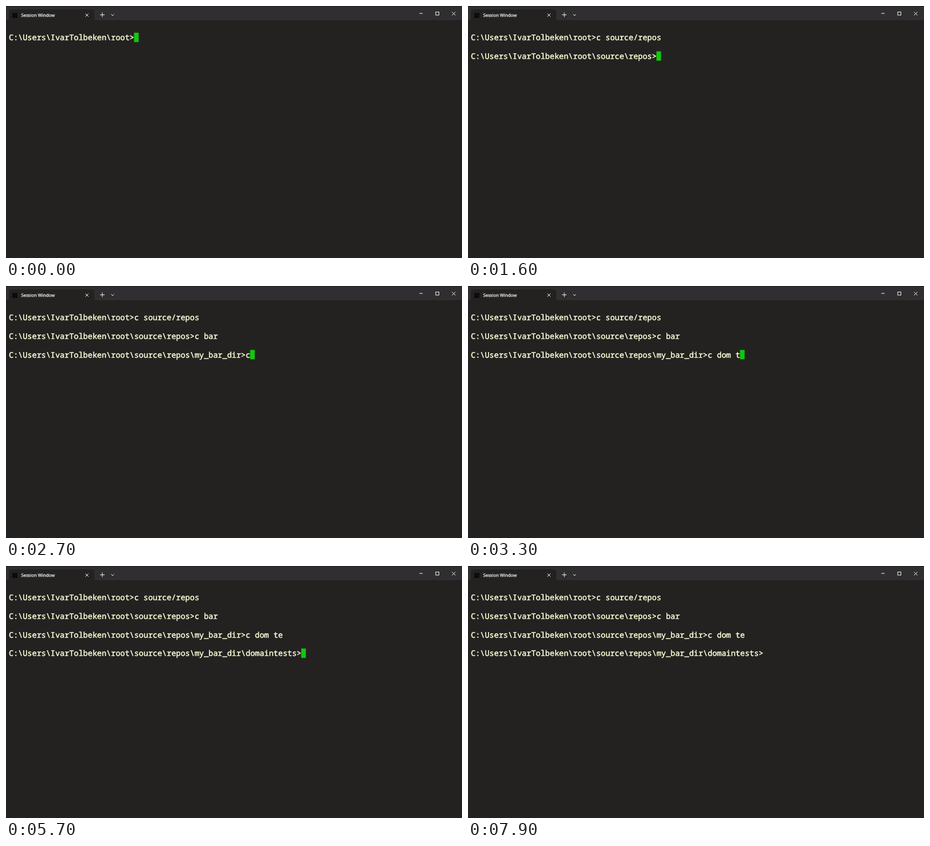
An HTML page for the animation above (8 s loop, 800 by 443 pixels).

```html
<!DOCTYPE html>
<html lang="en">
<head>
<meta charset="utf-8">
<title>Terminal</title>
<style>
  html, body { margin: 0; width: 100%; height: 100%; overflow: hidden; background: #232221; }
  svg { display: block; width: 800px; height: 443px; }
  text { white-space: pre; text-rendering: geometricPrecision; }
  .tab { font: 500 7.8px "Open Sans", "Noto Sans", sans-serif; fill: #fff; stroke: #fff; stroke-width: .25; }
  .line {
    font: 500 13.58px "Noto Sans Mono", "DejaVu Sans Mono", monospace;
    fill: #fffcd6; stroke: #fffcd6; stroke-width: .5;
  }
  .icons { fill: none; stroke: #f2f2f2; stroke-width: 1; }
</style>
</head>
<body>
<svg viewBox="0 0 800 443">
  <rect width="800" height="443" fill="#232221"/>
  <rect width="800" height="25" fill="#302e30"/>
  <rect width="800" height="1" fill="#1c1b1c"/>
  <path d="M2 25Q5 25 5 22V11Q5 6 10 6H150Q155 6 155 11V22Q155 25 158 25Z" fill="#232221"/>
  <rect x="11" y="12" width="9" height="9" fill="#0c0c0c"/>
  <text class="tab" x="26.5" y="19">Session Window</text>
  <g class="icons">
    <path d="M139.3 13.3l5.4 5.4M144.7 13.3l-5.4 5.4"/>
    <path d="M165 15.5h8M169 11.5v8"/>
    <path d="M184.5 14.5l2.5 2.5l2.5-2.5"/>
    <path d="M725 13h6"/>
    <rect x="754" y="10.5" width="5.5" height="5.5"/>
    <path d="M782.5 10.5l6 6M788.5 10.5l-6 6"/>
  </g>
  <rect id="cursor" width="8.15" height="16.4" fill="#13c60d"/>
  <g id="lines"></g>
</svg>
<script>
const LOOP = 8000, STEP = 100;
const LEFT = 5, TOP = 47, CELL = 8.148, PITCH = 32.7, BASE = 13.1;
const BLINK_START = 3900, BLINK = 600;
const home = "C:\\Users\\IvarTolbeken\\root";

// Each prompt appears at `at`; its command is typed one key per step from `type`.
const rows = [
  { at: 0, path: "", cmd: "c source/repos", type: 100, pause: 8 },
  { at: 1600, path: "\\source\\repos", cmd: "c bar", type: 1700 },
  { at: 2200, path: "\\source\\repos\\my_bar_dir", cmd: "c dom te", type: 2700 },
  { at: 3500, path: "\\source\\repos\\my_bar_dir\\domaintests", cmd: "", type: LOOP }
];

const cursor = document.getElementById("cursor");
const group = document.getElementById("lines");
rows.forEach((row, i) => {
  row.el = document.createElementNS("http://www.w3.org/2000/svg", "text");
  row.el.setAttribute("class", "line");
  row.el.setAttribute("x", LEFT);
  row.el.setAttribute("y", TOP + i * PITCH + BASE);
  group.append(row.el);
});

function typedCount(row, t) {
  const keys = Math.max(0, Math.floor((t - row.type) / STEP) + 1);
  // A short hesitation holds one key back after `pause` characters.
  return row.pause && keys > row.pause ? keys - 1 : keys;
}

function lineText(row, t) {
  if (t < row.at) return "";
  return home + row.path + ">" + row.cmd.slice(0, typedCount(row, t));
}

function cursorOn(t) {
  return t < BLINK_START || Math.floor((t - BLINK_START) / BLINK) % 2 === 1;
}

function draw(t) {
  rows.forEach((row, i) => {
    const text = lineText(row, t);
    if (row.el.textContent !== text) row.el.textContent = text;
    if (text) {
      cursor.setAttribute("x", LEFT + text.length * CELL - 0.4);
      cursor.setAttribute("y", TOP + i * PITCH);
    }
  });
  cursor.setAttribute("visibility", cursorOn(t) ? "visible" : "hidden");
}

let start;
function tick(now) {
  start ??= now;
  draw(Math.max(0, now - start) % LOOP);
  requestAnimationFrame(tick);
}
draw(0);
requestAnimationFrame(tick);
</script>
</body>
</html>
```
